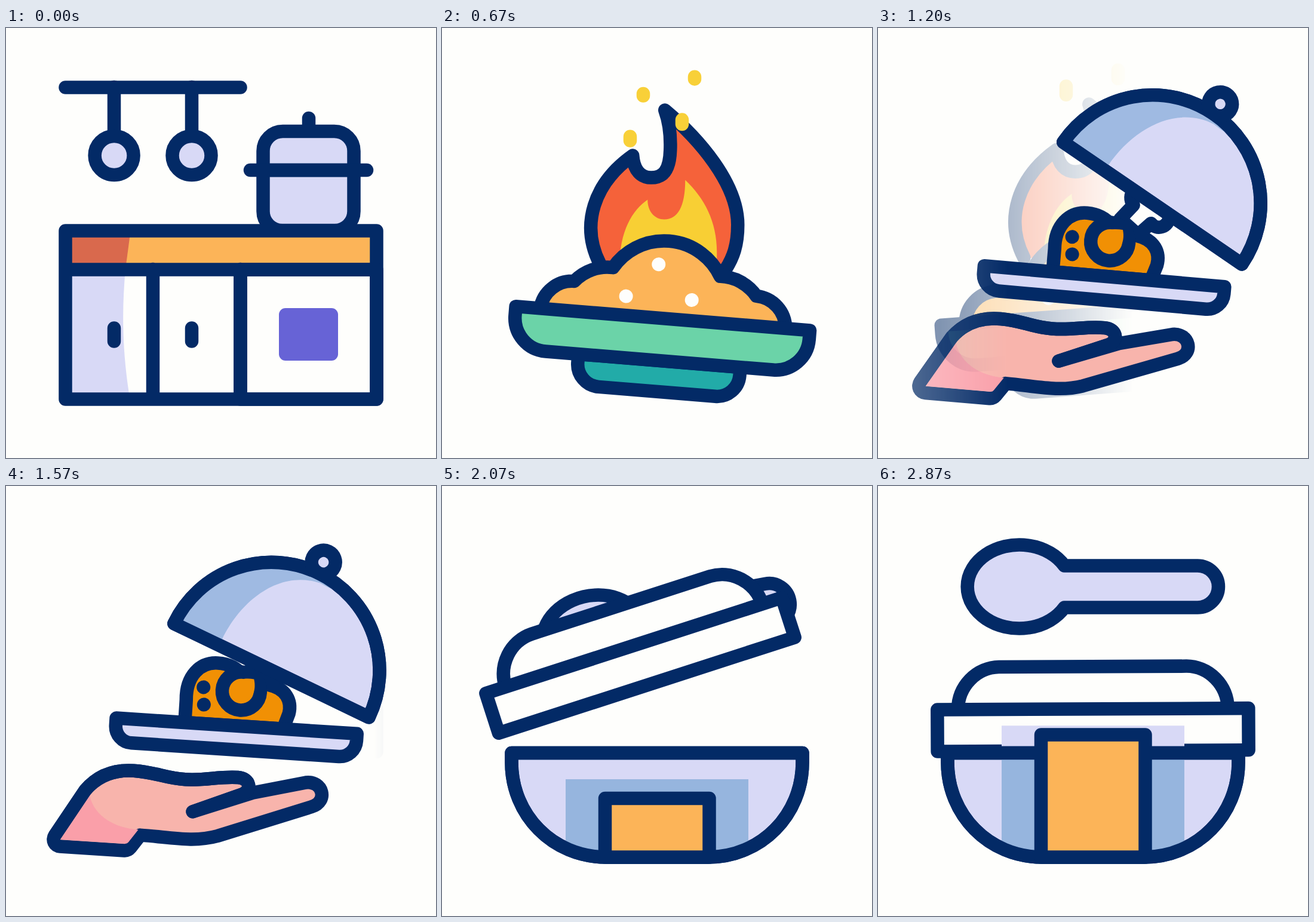
Write an HTML page that moves like this. It is 720 px wide and 720 px high and loops after 2910 ms.

```html
<!DOCTYPE html>
<html lang="en">
<head>
<meta charset="utf-8">
<title>Kitchen icons</title>
<style>
  html, body { margin: 0; width: 100%; height: 100%; overflow: hidden; background: #fefefc; }
  svg { position: absolute; inset: 0; width: 100%; height: 100%;
    fill: none; stroke: #032a66; stroke-width: 22.5; stroke-linecap: round; stroke-linejoin: round; }
  .plain { stroke: none; }
  .lav { fill: #d8d9f6; }
  .orange { fill: #fcb458; }
  .white { fill: #fefefc; }
  .violet { fill: #6763d6; }
  .navy { fill: #032a66; }
  .roast { fill: #f19004; }
  .blue { fill: #96b5de; }
  .spark { stroke: #f8d038; }
</style>
</head>
<body>
<!-- lunch box -->
<svg id="lunchArt" viewBox="0 0 720 720">
  <clipPath id="bowlClip"><path d="M116.5 447H603.5V463C603.5 550 535 621.5 445 621.5H275C185 621.5 116.5 550 116.5 463Z"/></clipPath>
  <path id="spoon" class="lav" d="M312 133.5H535A35 35 0 0 1 535 203.5H312A87 70 0 1 1 312 133.5Z"/>
  <g id="boxLid" class="white">
    <path d="M-226 -35A70 72 0 0 1 -157 -106H157A70 72 0 0 1 226 -35"/>
    <path d="M-260.5 -35H260.5V35H-260.5Z"/>
  </g>
  <rect id="wingTop" class="plain lav" x="207" width="306"/>
  <path class="lav" d="M116.5 447H603.5V463C603.5 550 535 621.5 445 621.5H275C185 621.5 116.5 550 116.5 463Z"/>
  <g clip-path="url(#bowlClip)"><rect id="wing" class="plain blue" x="207" width="306" height="300"/></g>
  <path d="M116.5 447H603.5V463C603.5 550 535 621.5 445 621.5H275C185 621.5 116.5 550 116.5 463Z"/>
  <path id="strap" class="orange"/>
  <ellipse id="dot" class="plain" fill="#f5623a"/>
</svg>

<!-- flaming dish -->
<svg id="dishArt" viewBox="0 0 720 720">
  <g id="flame">
    <path fill="#f5623a" d="M265 395C232 330 255 260 320 214C322 240 335 251 351 251C372 251 382 238 383 205C384 180 382 160 374 138C430 185 496 260 496 330C496 365 488 385 476 404"/>
    <path class="plain" fill="#f8cf34" d="M298 400C298 340 320 305 345 288C345 308 357 321 373 321C395 321 408 300 408 255C440 285 461 325 461 375V400Z"/>
  </g>
  <g id="dish">
    <path class="orange" d="M-206 0A54 54 0 0 1 -153 -50A76 76 0 0 1 -90 -78A104 104 0 0 1 90 -78A76 76 0 0 1 153 -50A54 54 0 0 1 206 0"/>
    <g class="plain white">
      <circle cx="-14.400" cy="-89.600" r="11.500"/>
      <circle cx="-64.500" cy="-32" r="11.500"/>
      <circle cx="45.700" cy="-34.600" r="11.500"/>
    </g>
    <path fill="#22aba8" d="M-136 71V85A38 38 0 0 0 -98 123H98A38 38 0 0 0 136 85V71Z"/>
    <path fill="#6bd3a8" d="M-247 0V15A56 56 0 0 0 -191 71H191A56 56 0 0 0 247 15V0Z"/>
  </g>
  <path id="sparks" class="spark"/>
</svg>

<!-- served roast -->
<svg id="serveArt" viewBox="0 0 720 720">
  <g id="serve">
    <path class="roast" d="M-87 0V-38C-90 -78 -68 -103 -38 -103C-18 -103 -5 -96 5 -85L50 -72C78 -68 90 -48 86 -26L78 0Z"/>
    <path class="white" d="M18 -98L38 -123C24 -140 40 -160 58 -145L100 -110C100 -90 80 -84 70 -95L50 -74Z"/>
    <circle class="roast" cx="4" cy="-58.600" r="32"/>
    <path class="plain roast" d="M-14 -50C-20 -74 2 -82 24 -80C30 -60 22 -40 4 -40Z"/>
    <circle class="plain navy" cx="-59.500" cy="-61" r="11.500"/>
    <circle class="plain navy" cx="-57" cy="-32" r="11.500"/>
    <path class="lav" d="M-202 0H202V12A28 28 0 0 1 174 40H-174A28 28 0 0 1 -202 12Z"/>
    <g id="cloche">
      <path class="lav" d="M-181 0A181 181 0 0 1 181 0Z"/>
      <path class="plain" fill="#9fbae2" d="M-170 -11C-164 -105 -90 -170 0 -170H40C45 -168 40 -165 10 -167C-60 -158 -97 -85 -97 -11Z"/>
      <path d="M-181 0A181 181 0 0 1 181 0Z"/>
      <circle class="lav" cx="0" cy="-201" r="20"/>
    </g>
    <path fill="#f8b4ac" d="M-292 203L-246 124C-224 94 -195 86 -167 86C-130 86 -115 95 -80 95C-45 95 -25 86 8 86C28 86 34 106 16 114L-64 148L34 110L122 87C150 82 162 116 134 127L-20 186C-60 200 -100 193 -149 193L-164 215Q-168 220.500 -174 220.500H-282A11.500 11.500 0 0 1 -292 203Z"/>
    <path class="plain" fill="#fa9fa9" d="M-282 209L-238 132C-228 168 -190 184 -153 184L-168 206Q-170 209 -174 209Z"/>
    <path d="M-292 203L-246 124C-224 94 -195 86 -167 86C-130 86 -115 95 -80 95C-45 95 -25 86 8 86C28 86 34 106 16 114L-64 148"/>
  </g>
  <path id="dashes" class="spark" opacity=".7"/>
</svg>

<!-- kitchen -->
<svg id="kitchenArt" viewBox="0 0 720 720">
  <g id="ring1"><path d="M181 99V180"/><circle class="lav" cx="181" cy="213.500" r="32.500"/></g>
  <g id="ring2"><path d="M311 99V180"/><circle class="lav" cx="311" cy="213.500" r="32.500"/></g>
  <path d="M99.500 99.500H392.500"/>
  <path id="potBody" class="lav" d="M430.500 238V307A32 32 0 0 0 462.500 339H550.500A32 32 0 0 0 582.500 307V238Z"/>
  <g id="potLid">
    <path d="M507 151V173"/>
    <path class="lav" d="M430.500 238V206A33 33 0 0 1 463.500 173H549.500A33 33 0 0 1 582.500 206V238Z"/>
    <path d="M409 238H604"/>
  </g>
  <g class="plain">
    <path class="orange" d="M100 340H620V404H100Z"/>
    <path fill="#d9694d" d="M100 340H208.500L200 404H100Z"/>
    <path class="lav" d="M100 404H200C194 470 194 540 207.500 621H100Z"/>
    <rect id="oven" class="violet" x="392" y="404" width="228"/>
  </g>
  <path d="M99.500 339.500H620.500V621.500H99.500ZM99.500 404.500H620.500M246 404V621M392.500 404V621M181 502.500V524.500M311 502.500V524.500"/>
  <path id="door"/>
  <rect id="pane" class="plain violet" rx="11"/>
</svg>

<script>
const LOOP = 2910, SWITCH = [443, 1100, 1783], SPEED = 3;
const $ = id => document.getElementById(id);
const layers = ['kitchenArt', 'dishArt', 'serveArt', 'lunchArt'].map($);
const clamp = v => Math.max(0, Math.min(1, v));
const ease = (t, a, b) => { const u = clamp((t - a) / (b - a)); return u * u * (3 - 2 * u); };
const bump = (t, a, b) => Math.sin(Math.PI * clamp((t - a) / (b - a))) ** 2;
const move = (id, value) => $(id).setAttribute('transform', value);
const set = (id, attrs) => { for (const k in attrs) $(id).setAttribute(k, attrs[k]); };

// x, start y, end y, start time, duration
const SPARKS = [
  [402, 140, 85, 250, 200], [337, 170, 108, 450, 235], [423, 140, 80, 450, 235],
  [402, 175, 60, 625, 300], [315, 205, 60, 630, 300],
  [337, 170, 108, 860, 235], [423, 140, 80, 860, 235],
  [315, 165, 65, 1050, 250], [402, 135, 40, 1050, 250]
];

// Soft wipe from right to left
function wipe(t) {
  layers.forEach((layer, i) => {
    const leaving = i === 0 || t > SWITCH[i - 1] + 250;
    const at = leaving ? SWITCH[i] : SWITCH[i - 1];
    let mask = 'none';
    if (at) {
      const e = (at - t) * SPEED, pct = x => (x / 7.2).toFixed(2) + '%';
      mask = leaving
        ? `linear-gradient(90deg, #000 ${pct(e + 80)}, transparent ${pct(e + 730)})`
        : `linear-gradient(90deg, transparent ${pct(e - 20)}, #000 ${pct(e + 520)})`;
    }
    layer.style.webkitMaskImage = layer.style.maskImage = mask;
  });
}

function kitchen(t) {
  const swing = u => -9 * Math.sin(Math.PI * Math.max(0, u) / 560);
  move('ring1', `rotate(${swing(t)} 181 99)`);
  move('ring2', `rotate(${swing(t - 40)} 311 99)`);
  const hop = bump(t, 0, 900);
  move('potLid', `translate(0 ${-38 * hop})`);
  move('potBody', `translate(0 ${-20.5 * hop})`);
  const open = ease(t, 100, 550), k = 1 - 0.38 * open;
  const y = v => 621.5 - (621.5 - v) * k;
  const top = y(404.5), flare = 12 * open, grow = 2.5 * open;
  set('oven', { height: top - 404 });
  set('door', { d: `M${392.5 - flare} ${top}H${620.5 + flare}L620.5 621.5H392.5Z` });
  set('pane', { x: 457 - grow, y: y(469), width: 99 + 2 * grow, height: 88 * k });
}

function dish(t) {
  const angle = 0.5 + 4.7 * Math.cos(2 * Math.PI * (t - 740) / 900);
  const q = (5 - angle) / 8, grown = ease(t, 250, 600);
  move('dish', `translate(${370.5 - 16 * q} ${486.5 - 6 * q}) rotate(${angle})`);
  const sx = 0.8 + 0.2 * grown, sy = 1.06 - 0.06 * grown;
  move('flame', `translate(${374 - 18 * q} ${400 - 9 * q}) scale(${sx} ${sy}) translate(-374 -400)`);
  set('sparks', { d: SPARKS.map(([x, from, to, start, time]) => {
    const u = (t - start) / time;
    if (u < 0 || u > 1) return '';
    const y = from + (to - from) * u, half = 0.5 + 7 * Math.sin(Math.PI * u);
    return `M${x} ${y - half}V${y + half}`;
  }).join('') });
}

function serve(t) {
  const p = 1.4 * bump(t, 920, 1800);
  move('serve', `translate(${407 - 28 * p} ${360 + 56 * p}) rotate(${5 * p})`);
  move('cloche', `translate(${70 * p} ${-129.6 * p}) rotate(${29.5 * p})`);
  const g = t > 1650 && t < 1950 ? Math.sin(Math.PI * (t - 1650) / 300) : 0;
  set('dashes', { d: g ? [27, 42, 55].map((len, i) => `M165.5 ${279 + 40.5 * i}h${-len * g}`).join('') : '' });
}

function lunch(t) {
  const p = 1.03 * bump(t, 1700, 2910), s = bump(t, 1830, 2850);
  move('boxLid', `translate(${360 - 58 * p * p} ${410 - 158 * p}) rotate(${-25.8 * p})`);
  move('spoon', `translate(${238 + 39 * s} ${168 + 185 * s}) rotate(${-23.3 * s}) translate(-238 -168)`);
  const top = 413 + 110 * (ease(t, 1730, 1930) - ease(t, 2670, 2895));
  const wing = 400 + (top - 415) * 0.843;
  set('strap', { d: `M273 621.5V${top}H447.5V621.5Z` });
  set('wing', { y: Math.max(wing, 447) });
  set('wingTop', { y: wing, height: Math.max(0, 447 - wing) });
  const pop = Math.min(1, 1.5 * bump(t, 2250, 2490));
  set('dot', { cx: 445, cy: 190 + (2370 - t) * 0.1, rx: 12 * pop, ry: 13 * pop });
}

function frame() {
  const t = performance.now() % LOOP;
  wipe(t);
  kitchen(t);
  dish(t);
  serve(t);
  lunch(t);
  requestAnimationFrame(frame);
}
frame();
</script>
</body>
</html>
```
